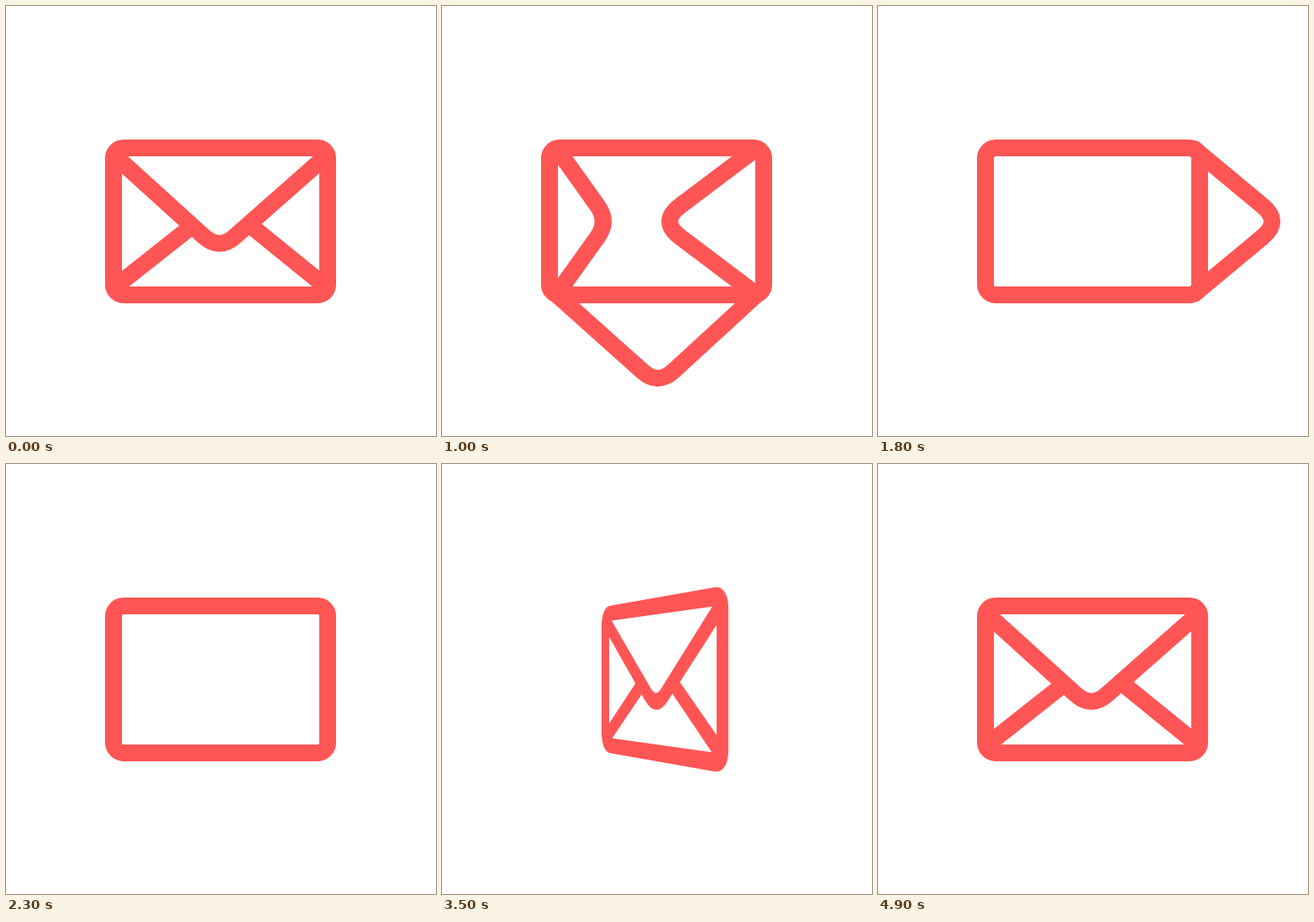
An HTML page that plays this animation: 512 px wide and 512 px high, repeating every 5000 ms.

```html
<!DOCTYPE html>
<html lang="en">
<head>
<meta charset="utf-8">
<title>Envelope</title>
<style>
  html, body { margin: 0; width: 100%; height: 100%; overflow: hidden; background: #fff; }
  svg { display: block; width: 512px; height: 512px; transform-origin: 255.5px 256.5px; }
</style>
</head>
<body>
<svg viewBox="0 0 512 512" fill="#fff" stroke="#f55" stroke-width="20">
  <path id="left" transform="translate(128 256.5) rotate(-90)"/>
  <path id="right" transform="translate(383 256.5) rotate(90)"/>
  <path id="bottom" transform="translate(255.5 344) rotate(180)"/>
  <path id="top" transform="translate(255.5 169)"/>
  <rect x="128" y="169" width="255" height="175" rx="12" fill="none"/>
</svg>
<script>
const LOOP = 5000, STEP = 100;
const FLIP_START = 2400, FLIP_MID = 3200, FLIP_END = 4800;
const OPEN = 124, COLLAPSE = 280;
const svg = document.querySelector('svg');

// half: half of the folded side, reach: closed tip depth, shift: sideways tip offset
const flaps = [
  { id: 'top', half: 127.5, reach: 122, shift: -1.5, start: 20, end: 600 },
  { id: 'bottom', half: 127.5, reach: 110, shift: -1.5, start: 377, end: 1115 },
  { id: 'left', half: 87.5, reach: 124, shift: 0, start: 772, end: 1513 },
  { id: 'right', half: 87.5, reach: 124, shift: 0, start: 1231, end: 1954 }
];
for (const f of flaps) f.el = document.getElementById(f.id);

const progress = (t, from, to) => Math.min(1, Math.max(0, (t - from) / (to - from)));

// A rounded triangle standing on its fold; a negative tip lies outside the envelope
function flapPath(half, base, tip, shift) {
  const r = 18.5, y = tip - r * (tip - base) / half;
  return `M${-half} ${base}L${shift - r} ${y}Q${shift} ${tip} ${shift + r} ${y}L${half} ${base}`;
}

function drawFlap(f, t) {
  const turn = progress(t, f.start, f.end);
  const gone = progress(t, f.end, f.end + COLLAPSE);
  const keep = Math.cos(gone * Math.PI / 2);
  const size = f.reach + (OPEN - f.reach) * turn;
  const tip = size * Math.cos(turn * Math.PI) * keep;
  f.el.style.display = gone < 1 ? '' : 'none';
  f.el.setAttribute('d', flapPath(f.half, 8 * keep, tip, f.shift));
}

// Speeds up until edge-on, then the other face swings in and slows down
function flipAngle(t) {
  return t < FLIP_MID
    ? 90 * progress(t, FLIP_START, FLIP_MID) ** 3
    : -90 * (1 - progress(t, FLIP_MID, FLIP_END)) ** 2.16;
}

function draw(now) {
  const t = Math.floor(now % LOOP / STEP) * STEP;
  const angle = flipAngle(t);
  for (const f of flaps) drawFlap(f, t < FLIP_MID ? t : 0);
  svg.style.transform = angle ? `perspective(868px) rotateY(${angle}deg)` : 'none';
}

let origin;
function frame(now) {
  origin ??= now;
  draw(now - origin);
  requestAnimationFrame(frame);
}
draw(0);
requestAnimationFrame(frame);
</script>
</body>
</html>
```
